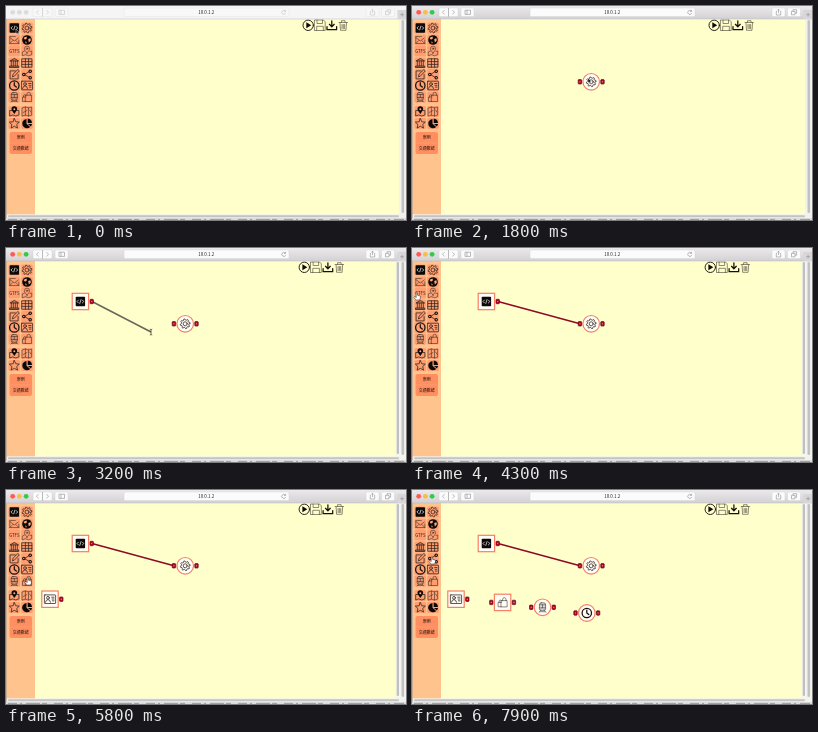
Animation, 400 px wide and 214 px high, one loop 8000 ms. Source, as an HTML page:

```html
<!DOCTYPE html>
<html lang="zh-Hant">
<head>
<meta charset="utf-8">
<title>Flow editor</title>
<style>
html, body { margin: 0; width: 100%; height: 100%; overflow: hidden; background: #ffffcb; }
svg { display: block; width: 100%; height: 100%; }
text { font-family: "Noto Sans CJK TC", "Noto Sans CJK SC", "Noto Sans CJK JP", "Noto Sans", sans-serif; text-anchor: middle; }
.ink { fill: none; stroke: #2a211d; stroke-width: .75; stroke-linejoin: round; stroke-linecap: round; }
.bold { stroke: #14100e; stroke-width: 1.25; }
.thin { stroke-width: .65; stroke-opacity: .8; }
.solid { fill: #0c0a09; stroke: none; }
.chrome { fill: #fbfbfb; stroke: #d2d0d2; stroke-width: .4; }
.mark { fill: none; stroke: #8e8e8e; stroke-width: .6; }
.frame { fill: #fffdf6; stroke: #f67f66; stroke-width: 1.2; }
</style>
</head>
<body>
<svg viewBox="0 0 400 214" preserveAspectRatio="none">
  <defs>
    <linearGradient id="bar" x2="0" y2="1">
      <stop stop-color="#ebe9eb"/><stop offset="1" stop-color="#d3d1d3"/>
    </linearGradient>
    <g id="code">
      <rect class="solid" x="-4.7" y="-4.7" width="9.4" height="9.4" rx=".8"/>
      <path d="M-1.7-1.7-3.4 0-1.7 1.7M1.7-1.7 3.4 0 1.7 1.7M.7-2.2-.7 2.2" fill="none" stroke="#fff" stroke-width=".7"/>
    </g>
    <g id="gear" class="ink"><path id="teeth"/><circle r="2"/></g>
    <g id="mail" class="ink thin">
      <path d="M-4.5-2.5V3.5H4.5V0M-4.5-2.5 0 1 4-2M-4.5-3.5H1M-4.5 3.5-1.5.5M4.5 3.5 1.5.5"/>
    </g>
    <g id="globe">
      <circle class="solid" r="4.8"/>
      <path d="M-3.4-2.2-.5-3.6 0-1.8-1.5-.4-2.6-.7ZM1.2-1 3.5-1.8 3.8.6 1.8 2.6ZM-1.8 1.4-.3 2-1 3.9Z" fill="#ffab7c"/>
    </g>
    <g id="gtfs"><text y="1.5" font-size="4.3" font-weight="500" fill="#332018">GTFS</text></g>
    <g id="place" class="ink thin">
      <path d="M-2.5 0-4.7 1V4.8L-1.5 3.6 1.5 4.8 4.7 3.6V0L3 .4M0 2.2C-2-.5-2.6-1.2-2.6-2.3A2.6 2.6 0 0 1 2.6-2.3C2.6-1.2 2-.5 0 2.2Z"/>
      <circle cy="-2.3" r=".8"/>
    </g>
    <g id="bank" class="ink">
      <path d="M-4-2.2 0-4.6 4-2.2ZM-3-2V3M-1-2V3M1-2V3M3-2V3M-4.4 3H4.4V4.5H-4.4Z" fill="#4a3a30" fill-opacity=".35"/>
    </g>
    <g id="table" class="ink">
      <path d="M-4.9-4.2H4.9V4.2H-4.9ZM-4.9-1.4H4.9M-4.9 1.4H4.9M-1.6-4.2V4.2M1.6-4.2V4.2"/>
    </g>
    <g id="edit" class="ink">
      <path d="M1-3.6H-4.2V4.4H3.8V0M-1.8 2-1.2-.4 3.6-5 5-3.6.4 1.3Z"/>
    </g>
    <g id="share" class="ink">
      <path d="M2.4-3-2.6 0 2.4 3"/>
      <g class="solid"><circle cx="3.2" cy="-3.2" r="1.7"/><circle cx="-3.2" r="1.7"/><circle cx="3.2" cy="3.2" r="1.7"/></g>
      <g fill="#ffab7c" stroke="none"><circle cx="3.2" cy="-3.2" r=".7"/><circle cx="-3.2" r=".7"/><circle cx="3.2" cy="3.2" r=".7"/></g>
    </g>
    <g id="clock" class="ink bold"><circle r="4.7"/><path d="M0-2.8V0L2 1.6"/></g>
    <g id="card" class="ink">
      <rect x="-5.6" y="-4.3" width="11.2" height="8.6" rx=".5"/>
      <circle cx="-2" cy="-1.4" r="1.4"/>
      <path d="M-4.5 3Q-4 .4-2 .4T.5 3M1.7-2H4M2-.2H4M2.4 1.6H4"/>
    </g>
    <g id="train" class="ink thin">
      <rect x="-3.1" y="-4.5" width="6.2" height="7.8" rx="1.8" fill="#777" fill-opacity=".25"/>
      <path d="M-3-2.5H3M-3 .5H3M0-2.5V.5M-2 3.4-3.3 5M2 3.4 3.3 5M-2.5 4.4H2.5M-1.7 1.9H-1.5M1.5 1.9H1.7"/>
    </g>
    <g id="bag" class="ink thin">
      <path d="M-1.5 4.4H-4.5V0H-1M-3.5 0V-1.4A1.3 1.3 0 0 1-1-1.4M-1.3-1.8H4.5V4.5H-1.3ZM0-1.8V-3A1.7 1.7 0 0 1 3.4-3V-1.8"/>
    </g>
    <g id="pin" class="ink">
      <path d="M-2.5-1H-4.6V4.5L-1.5 3.4 1.5 4.5 4.6 3.4V-1H2.5"/>
      <path class="solid" d="M0 2.6C-2.2-.5-2.8-1.4-2.8-2.4A2.8 2.8 0 0 1 2.8-2.4C2.8-1.4 2.2-.5 0 2.6Z"/>
      <circle cy="-2.3" r="1" fill="#ffab7c" stroke="none"/>
    </g>
    <g id="map" class="ink thin">
      <path d="M-4.6-3.6-1.6-4.5 1.5-3.6 4.6-4.5V3.6L1.5 4.5-1.6 3.6-4.6 4.5ZM-1.6-4.5V3.6M1.5-3.6V4.5M2.6-1.5 3.8.5M-3.8 1 0-1"/>
    </g>
    <g id="star" class="ink">
      <path d="M0-5 1.5-1.7 5-1.4 2.4 1 3.2 4.6 0 2.8-3.2 4.6-2.4 1-5-1.4-1.5-1.7Z"/>
    </g>
    <g id="pie">
      <path class="solid" d="M-.5-4.6A4.7 4.7 0 1 0 3.2 3.4L-.5.3ZM.7-4.9A4.8 4.8 0 0 1 5-.6L.7-.4ZM.9.5H5A4.6 4.6 0 0 1 3.9 2.9Z"/>
    </g>
    <g id="port">
      <rect x="-1.7" y="-2.2" width="3.4" height="4.4" rx=".7" fill="#b4082c" stroke="#5e0718" stroke-width=".7"/>
      <circle r=".6" fill="#e9a0a0"/>
    </g>
    <path id="hand" d="M-.8-3.2Q0-4 .6-3.2V-.7L3.1 0Q3.8.4 3.4 2L2.6 4H-1.2L-3.2 1.2Q-2.8.2-1.6 1L-.8 1.6Z" fill="#fff" stroke="#222" stroke-width=".5"/>
    <path id="arrow" d="M0 0V5L1.2 4 2 5.7 2.8 5.3 2.1 3.6H3.6Z" fill="#111" stroke="#fff" stroke-width=".4"/>
    <path id="beam" d="M-1.2-2.8Q0-2.8 0-2Q0-2.8 1.2-2.8M0-2V2.2M-1.2 3Q0 3 0 2.2Q0 3 1.2 3" fill="none" stroke="#333" stroke-width=".7"/>
  </defs>

  <rect width="400" height="214" fill="#ffffcb"/>
  <rect y="13" width="29" height="196" fill="#ffc48e"/>
  <g id="palette"></g>
  <rect x="3.5" y="126" width="22.5" height="22" rx="2" fill="#ff8f60"/>
  <path d="M4 137H25.5" stroke="#ffa277" stroke-width=".6"/>
  <g font-size="4" font-weight="500" fill="#1c0f0a">
    <text x="14.8" y="133.3">案例</text>
    <text x="14.8" y="143.7">交通數據</text>
  </g>

  <g id="tools" class="ink">
    <circle cx="302.2" cy="19.3" r="5.2" stroke-width="1"/>
    <path class="solid" d="M300.3 16.3 305.2 19.3 300.3 22.3Z"/>
    <path class="thin" d="M308.8 14H317.4L319.2 15.8V24.5H308.8ZM311 14.2V17.5H316.5V14.2M310.7 24.3V20.3H317.3V24.3"/>
    <path class="bold" d="M325.8 14.8V20.5M323.4 18.3 325.8 20.8 328.2 18.3M321 20.5V23.7H330.6V20.5"/>
    <path class="thin" d="M333 16.5H341.5M335.5 16.2V14.7H339V16.2M334 17 334.5 24.3H340L340.5 17M336 18.5V22.6M337.3 18.5V22.6M338.6 18.5V22.6"/>
  </g>

  <path id="wire" fill="none"/>
  <g id="nodes"></g>

  <rect x="393" y="13" width="7" height="199" fill="#f2f2ee"/>
  <rect x="395.5" y="14" width="2.6" height="193" rx="1.3" fill="#c2c2c2"/>
  <g id="scroll">
    <rect x="389.5" y="13" width="4.5" height="195" fill="#f6f6f0"/>
    <rect x="390.7" y="14" width="2.3" height="192" rx="1.1" fill="#c0c0c0"/>
  </g>
  <rect y="208.3" width="400" height="3.7" fill="#f1f1ee"/>
  <rect x="2" y="209.2" width="391" height="2" rx="1" fill="#c3c3c3"/>
  <rect y="212" width="400" height="2" fill="#dcdcdc"/>
  <path d="M2 213.4H398" stroke="#8c8c8c" stroke-width=".8" stroke-dasharray="9 3 2 4 14 2 5 7"/>
  <path d="M.4 13V212" stroke="#b8a898" stroke-width=".8"/>

  <rect width="400" height="13" fill="url(#bar)"/>
  <rect id="idleBar" width="400" height="13" fill="#f5f5f5"/>
  <path d="M0 13H400" stroke="#b4b4b4" stroke-width=".5"/>
  <g id="lights">
    <circle cx="6.7" cy="6.3" r="2.4" fill="#fc5b57"/>
    <circle cx="13.4" cy="6.3" r="2.4" fill="#fdbc40"/>
    <circle cx="20.1" cy="6.3" r="2.4" fill="#35c84b"/>
  </g>
  <g id="idleLights" fill="#dcdcdc">
    <circle cx="6.7" cy="6.3" r="2.4"/><circle cx="13.4" cy="6.3" r="2.4"/><circle cx="20.1" cy="6.3" r="2.4"/>
  </g>
  <g id="controls">
    <g class="chrome">
      <rect x="27" y="2" width="19" height="8.6" rx="1.4"/>
      <rect x="49" y="2" width="13" height="8.6" rx="1.4"/>
      <rect x="118" y="2" width="165" height="8.6" rx="1.4"/>
      <rect x="360" y="2" width="13" height="8.6" rx="1.4"/>
      <rect x="375.5" y="2" width="13" height="8.6" rx="1.4"/>
    </g>
    <path class="mark" d="M32.5 4.2 30.5 6.3 32.5 8.4M40.5 4.2 42.5 6.3 40.5 8.4M36.5 2V10.6M53 4.2H58.5V8.4H53ZM55 4.2V8.4M279.4 5.2A2 2 0 1 0 279.7 7M279.6 3.8V5.4H278M365 5.5H364.3V9H368.7V5.5H368M366.5 7V3.3M365.2 4.5 366.5 3.2 367.8 4.5M379.5 5.3H383V8.8H379.5ZM381 5.3V3.7H384.6V7.2H383"/>
  </g>
  <rect x="391.5" y="4" width="8.5" height="9" fill="#d8d6d8"/>
  <path class="mark" d="M394.2 8.7H398M396.1 6.8V10.6"/>
  <text x="200.2" y="8" font-size="4.4" font-weight="500" fill="#222">10.0.1.2</text>

  <g id="pointer">
    <g id="ghost">
      <rect x="-5.4" y="-5.2" width="10.8" height="10.4" fill="#686858" fill-opacity=".85"/>
      <use id="ghostIcon" opacity=".6"/>
    </g>
    <use id="cursor"/>
  </g>
</svg>
<script>
const LOOP = 8000, STEP = 100;
const $ = id => document.getElementById(id);
const use = (id, x, y) => `<use href="#${id}" x="${x}" y="${y}"/>`;

// Eight teeth, four corners each.
$('teeth').setAttribute('d', 'M' + Array.from({ length: 32 }, (_, i) => {
  const a = (i + .5) * Math.PI / 16, r = i % 4 < 2 ? 3.7 : 4.9;
  return `${(r * Math.cos(a)).toFixed(2)} ${(r * Math.sin(a)).toFixed(2)}`;
}).join('L') + 'Z');

const rows = [22, 34, 45, 57, 68.5, 79.5, 91, 105.5, 117.5];
const icons = 'code gear mail globe gtfs place bank table edit share clock card train bag pin map star pie'.split(' ');
$('palette').innerHTML = icons.map((id, i) => {
  const x = i % 2 ? 21 : 8.3, y = rows[i >> 1];
  return `<rect x="${x - 5.8}" y="${y - 5.5}" width="11.6" height="11" rx="1.6" fill="#ff9e70"/>` + use(id, x, y);
}).join('');

// ports: 1 = left, 2 = right
const nodes = [
  { icon: 'gear', x: 179.2, y: 75.8, at: 1700, round: true, ports: 3 },
  { icon: 'code', x: 74.4, y: 53.5, at: 2700, ports: 2 },
  { icon: 'card', x: 44, y: 109.2, at: 5300, ports: 2 },
  { icon: 'bag', x: 90.6, y: 112.4, at: 6200, ports: 3 },
  { icon: 'train', x: 130.5, y: 117.3, at: 6800, round: true, ports: 3 },
  { icon: 'clock', x: 174.8, y: 123, at: 7500, round: true, ports: 3 }
];
$('nodes').innerHTML = nodes.map(({ icon, x, y, round, ports }) => {
  const frame = round
    ? `<circle class="frame" cx="${x}" cy="${y}" r="8.3"/>`
    : `<rect class="frame" x="${x - 8.2}" y="${y - 8.2}" width="16.4" height="16.4"/>`;
  return `<g>${frame}${use(icon, x, y)}${ports & 1 ? use('port', x - 11.3, y) : ''}${ports & 2 ? use('port', x + 11.3, y) : ''}</g>`;
}).join('');

// time, x, y, then the cursor shape or dragged icon until the next key
const path = [
  [0, 10, 23, 'arrow'], [500, 21, 23, 'hand'], [900, 21, 22, 'drag gear'],
  [1600, 176, 73, 'drag gear'], [1700, 176, 72, 'arrow'], [1900, 176, 72, 'arrow'],
  [2200, 8, 23, 'hand'], [2300, 8, 23, 'drag code'], [2700, 72, 52, 'arrow'],
  [2900, 86, 53.5, 'beam'], [3200, 145, 84, 'beam'], [3600, 168, 76, 'arrow'],
  [3900, 150, 78, 'arrow'], [4200, 6, 50, 'hand'], [4300, 5, 48, 'hand'],
  [4700, 21, 80, 'hand'], [4800, 21, 80, 'drag card'], [5300, 42, 108, 'arrow'],
  [5700, 22, 91, 'hand'], [5900, 22, 91, 'drag bag'], [6200, 89, 111, 'arrow'],
  [6400, 9, 91, 'drag train'], [6600, 123, 109, 'drag train'], [6800, 129, 116, 'arrow'],
  [7000, 9, 80, 'hand'], [7100, 9, 80, 'drag clock'], [7500, 173, 121, 'arrow'],
  [7800, 20, 70, 'hand'], [8000, 20, 70, 'hand']
];

function pointerAt(t) {
  const i = path.findIndex((key, n) => n + 1 === path.length || t < path[n + 1][0]);
  const [t0, x0, y0, mode] = path[i], [t1, x1, y1] = path[i + 1] || path[i];
  const p = t1 > t0 ? (t - t0) / (t1 - t0) : 0;
  const e = p * p * (3 - 2 * p);
  return { x: x0 + (x1 - x0) * e, y: y0 + (y1 - y0) * e, mode };
}

const show = (el, on) => el.setAttribute('visibility', on ? 'visible' : 'hidden');

function draw() {
  const t = Math.floor(performance.now() % LOOP / STEP) * STEP;
  const { x, y, mode } = pointerAt(t);
  const [kind, icon] = mode.split(' ');
  const dragging = kind === 'drag';

  $('pointer').setAttribute('transform', `translate(${x} ${y})`);
  $('cursor').setAttribute('href', '#' + (dragging ? 'arrow' : kind));
  show($('ghost'), dragging);
  if (icon) $('ghostIcon').setAttribute('href', '#' + icon);

  // The window gains focus with the first press.
  const idle = t < 600;
  show($('idleBar'), idle);
  show($('idleLights'), idle);
  show($('lights'), !idle);
  $('controls').setAttribute('opacity', idle ? .5 : 1);

  nodes.forEach((node, i) => show($('nodes').children[i], t >= node.at));

  const joined = t >= 3600, wire = $('wire');
  show(wire, t >= 2900);
  wire.setAttribute('d', `M86 53.5L${joined ? '168 75.8' : x + ' ' + y}`);
  wire.setAttribute('stroke', joined ? '#8e0a24' : '#66665c');
  wire.setAttribute('stroke-width', 1.5);

  // The second scrollbar narrows the canvas.
  const narrow = t >= 2700;
  show($('scroll'), narrow);
  $('tools').setAttribute('transform', `translate(${narrow ? -3.9 : 0} 0)`);
  requestAnimationFrame(draw);
}
draw();
</script>
</body>
</html>
```
